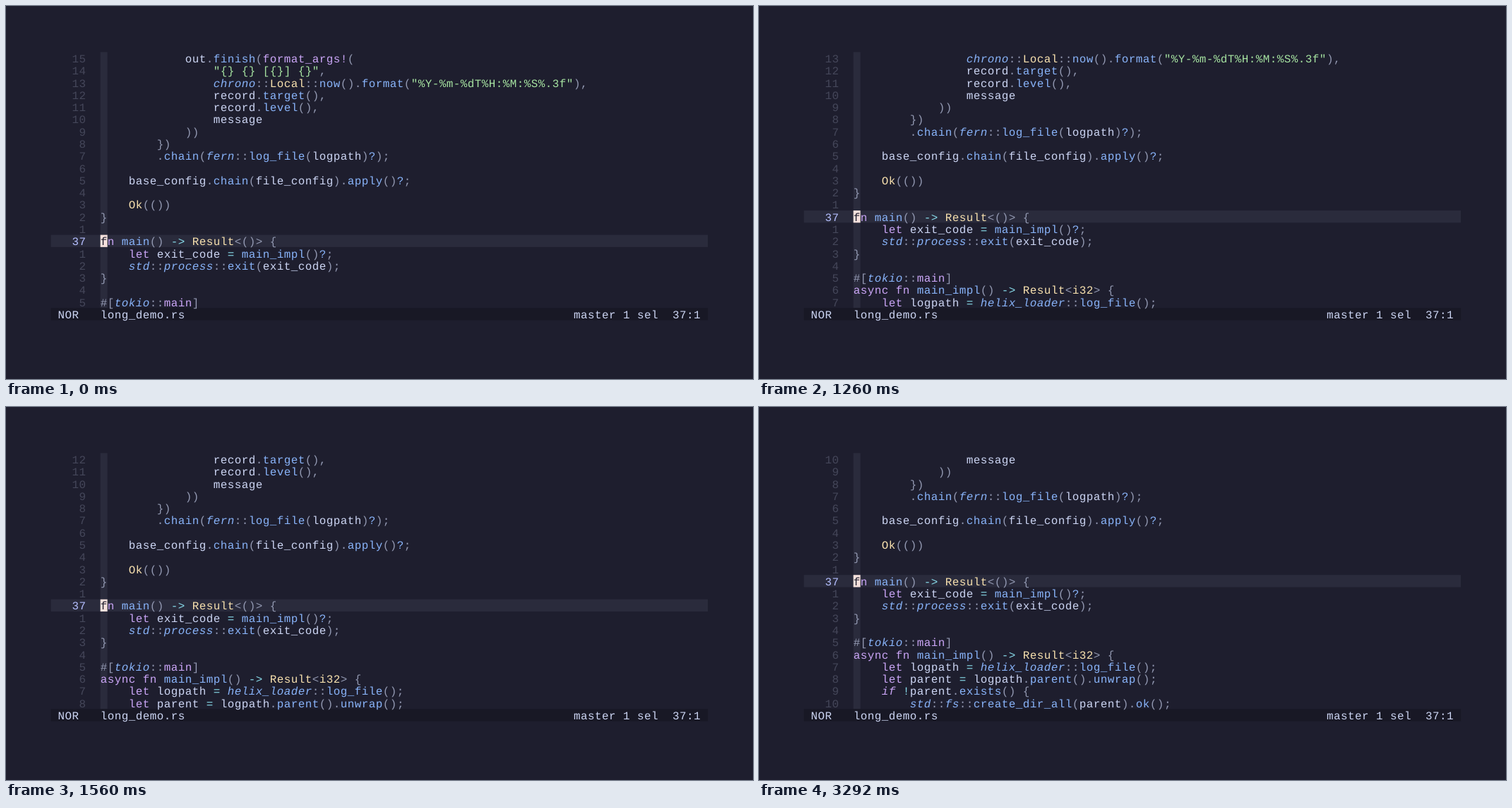
Write an HTML page that moves like this. It is 1058x529 px and loops after 4.06 s.

```html
<!DOCTYPE html>
<html lang="en">
<head>
<meta charset="utf-8">
<title>Scrolling the view</title>
<style>
  html, body { margin: 0; width: 100%; height: 100%; overflow: hidden; background: #1e1e2e; }
  svg { display: block; width: 1058px; height: 529px; }
  text {
    font-family: "Liberation Mono", "DejaVu Sans Mono", monospace;
    white-space: pre;
    text-rendering: geometricPrecision;
    fill: #cdd6f4;
  }
  .punct { fill: #9399b2; }
  .string { fill: #a6e3a1; }
  .keyword { fill: #cba6f7; }
  .cond { fill: #cba6f7; font-style: italic; }
  .path { fill: #89b4fa; font-style: italic; }
  .call { fill: #89b4fa; }
  .type { fill: #f9e2af; }
  .op { fill: #89dceb; }
  .number { fill: #45475a; }
  .current { fill: #b4befe; }
  .under { fill: #1e1e2e; }
</style>
</head>
<body>
<svg id="stage" viewBox="0 0 1058 529"></svg>
<script>
const CELL = 10.005, ROW = 17.28, LEFT = 63.6, TOP = 65.4;
const SIZE = 15.85, BASELINE = 14.7;
const COLS = 93, ROWS = 21, CODE_COL = 7, CURSOR_LINE = 15, CURSOR_NUMBER = 37;
const LOOP = 4060, SCROLL_TIMES = [960, 1260, 1560, 1860, 2140];

const CODE = String.raw`            out.finish(format_args!(
                "{} {} [{}] {}",
                chrono::Local::now().format("%Y-%m-%dT%H:%M:%S%.3f"),
                record.target(),
                record.level(),
                message
            ))
        })
        .chain(fern::log_file(logpath)?);

    base_config.chain(file_config).apply()?;

    Ok(())
}

fn main() -> Result<()> {
    let exit_code = main_impl()?;
    std::process::exit(exit_code);
}

#[tokio::main]
async fn main_impl() -> Result<i32> {
    let logpath = helix_loader::log_file();
    let parent = logpath.parent().unwrap();
    if !parent.exists() {
        std::fs::create_dir_all(parent).ok();`.split("\n");

// First matching rule gives the token its class.
const RULES = [
  ["string", /"[^"]*"/y],
  ["keyword", /\b(?:fn|let|async)\b|\w+!|main(?=\])/y],
  ["cond", /if\b/y],
  ["type", /[A-Z]\w*|i32\b/y],
  ["path", /\w+(?=::)/y],
  ["call", /\w+(?=\()|\?/y],
  ["op", /->|[=!]/y],
  ["plain", /\w+|\s+/y],
  ["punct", /[^\w\s]/y]
];

const stage = document.getElementById("stage");
const colX = col => LEFT + col * CELL;
const rowY = row => TOP + row * ROW;

function add(parent, name, attrs = {}, content = "") {
  const node = document.createElementNS("http://www.w3.org/2000/svg", name);
  for (const key in attrs) node.setAttribute(key, attrs[key]);
  node.textContent = content;
  return parent.appendChild(node);
}

function box(parent, col, row, cols, rows, fill) {
  return add(parent, "rect", {
    x: colX(col), y: rowY(row), width: cols * CELL, height: rows * ROW, fill
  });
}

function label(parent, col, content, cls = "plain") {
  return add(parent, "text", {
    x: colX(col), y: TOP + BASELINE, class: cls, "font-size": SIZE,
    "letter-spacing": CELL - SIZE * 1229 / 2048
  }, content);
}

function highlight(parent, source) {
  const line = label(parent, CODE_COL, "");
  let at = 0;
  while (at < source.length) {
    for (const [cls, rule] of RULES) {
      rule.lastIndex = at;
      const match = rule.exec(source);
      if (!match) continue;
      add(line, "tspan", { class: cls }, match[0]);
      at += match[0].length;
      break;
    }
  }
}

const moveToRow = (node, row) => node.setAttribute("transform", `translate(0 ${row * ROW})`);

// Backgrounds
box(stage, CODE_COL, 0, 1, ROWS, "#2a2b3c");
box(stage, 0, ROWS, COLS, 1, "#181825");
const cursorBar = box(stage, 0, 0, COLS, 1, "#2a2b3c");

// Numbered code lines
const lines = CODE.map((source, i) => {
  const group = add(stage, "g");
  const current = i === CURSOR_LINE;
  const number = String(current ? CURSOR_NUMBER : Math.abs(i - CURSOR_LINE));
  label(group, 5 - number.length, number, current ? "current" : "number");
  highlight(group, source);
  if (current) {
    box(group, CODE_COL, 0, 1, 1, "#f5e0dc");
    label(group, CODE_COL, source[0], "under");
  }
  return group;
});

// Status line
const status = add(stage, "g");
moveToRow(status, ROWS);
label(status, 1, "NOR");
label(status, CODE_COL, "long_demo.rs");
label(status, 74, "master 1 sel  37:1");

let shown = -1;
function scrollTo(offset) {
  if (offset === shown) return;
  shown = offset;
  moveToRow(cursorBar, CURSOR_LINE - offset);
  lines.forEach((line, i) => {
    const row = i - offset;
    line.style.display = row >= 0 && row < ROWS ? "" : "none";
    moveToRow(line, row);
  });
}

const start = performance.now();
function tick() {
  const t = (performance.now() - start) % LOOP;
  scrollTo(SCROLL_TIMES.filter(time => t >= time).length);
  requestAnimationFrame(tick);
}
tick();
</script>
</body>
</html>
```
